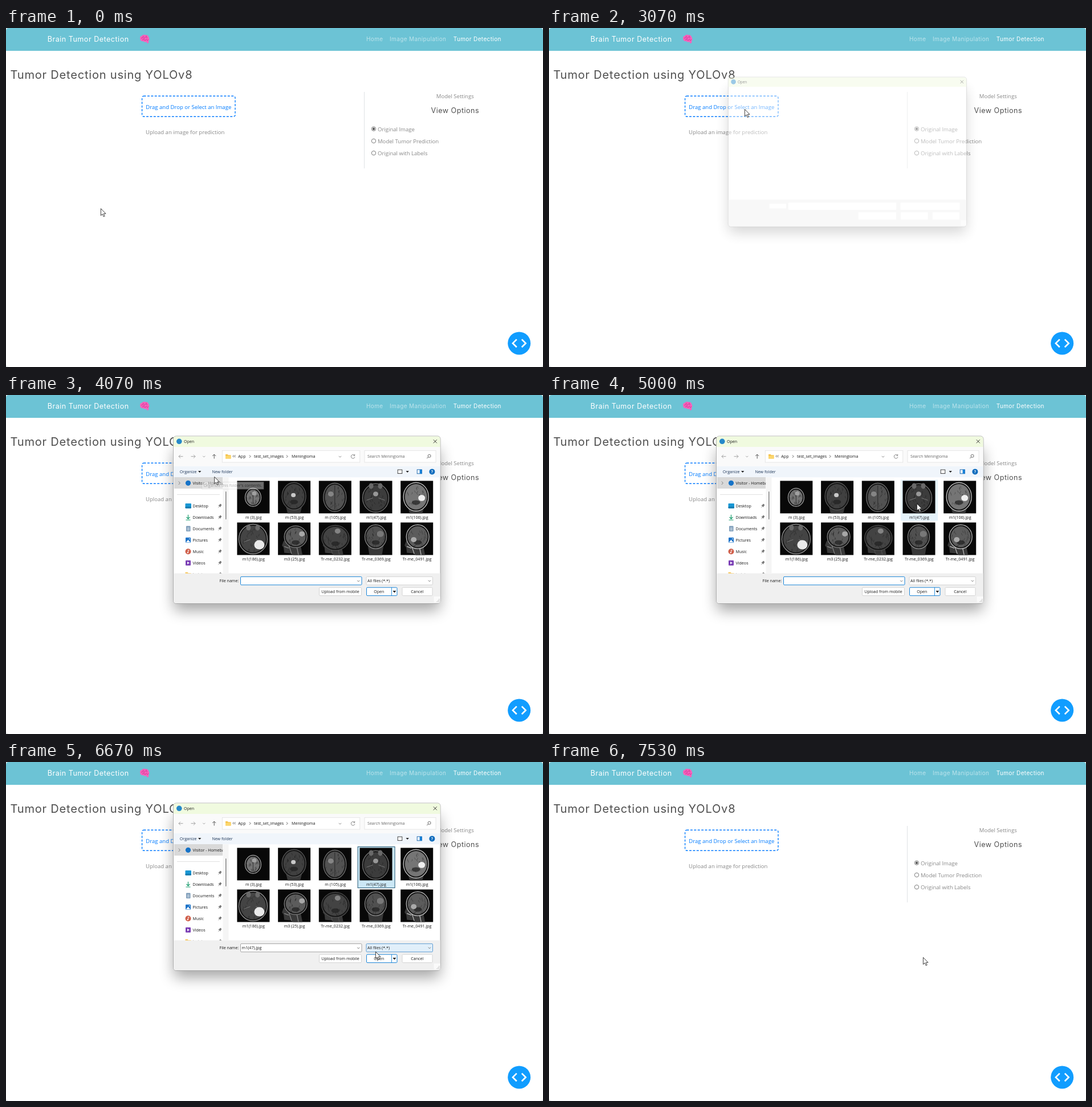
These frames come from a looping animation (942x594 px, 8 s). An HTML page:

```html
<!DOCTYPE html>
<html lang="en">
<head>
<meta charset="utf-8">
<title>Brain Tumor Detection</title>
<style>
html, body { margin: 0; width: 100%; height: 100%; overflow: hidden; background: #fff; }
svg { display: block; width: 942px; height: 594px; }
text { font-family: "Open Sans", "Noto Sans", sans-serif; white-space: pre; }
.head { font-family: Inter, "Open Sans", sans-serif; letter-spacing: .038em; }
</style>
</head>
<body>
<svg id="stage" viewBox="0 0 942 594" xmlns="http://www.w3.org/2000/svg"></svg>
<script>
const LOOP = 8000, STEP = 200 / 3;
const BLUE = '#007bff', ACCENT = '#0078d4', GREY = '#888', INK = '#1b1b1b', NAVY = '#1d3557';

const rect = (x, y, w, h, fill, extra = '') =>
  `<rect x="${x}" y="${y}" width="${w}" height="${h}" fill="${fill}" ${extra}/>`;
const oval = (x, y, rx, ry, fill, extra = '') =>
  `<ellipse cx="${x}" cy="${y}" rx="${rx}" ry="${ry}" fill="${fill}" ${extra}/>`;
const line = (d, color, w = 1, extra = '') =>
  `<path d="${d}" fill="none" stroke="${color}" stroke-width="${w}" ${extra}/>`;
const shape = (d, fill) => `<path d="${d}" fill="${fill}"/>`;
const text = (x, y, s, size, fill, extra = '') =>
  `<text x="${x}" y="${y}" font-size="${size}" fill="${fill}" ${extra}>${s}</text>`;
const label = (x, y, s, fill = INK, extra = '') => text(x, y, s, 7.1, fill, extra);
const body = (x, y, s, fill = GREY, extra = '') => text(x, y, s, 9.55, fill, extra);
const head = (x, y, s, size, fill, extra = '') => text(x, y, s, size, fill, `class="head" ${extra}`);
const group = (id, inner, extra = '') => `<g id="${id}" ${extra}>${inner}</g>`;
const MID = 'text-anchor="middle"';

function page() {
  const radio = (y, name, on) =>
    oval(645, y, 3.7, 3.7, '#fff', 'stroke="#6f6f6f" stroke-width=".9"') +
    (on ? oval(645, y, 2.2, 2.2, '#5a5a5a') : '') + body(652, y + 4, name);
  const brain =
    shape('M235.2 18.5C234.4 15 237 13.6 238.6 13.4 240.5 11.4 244 11.5 245.3 12.4 248 12 250 14 250.2 16 252 18 251.6 21.5 250 22.6L250.4 25.8 247.8 27.2 246.4 24.2C243.6 25.4 242 24 241 23.2 237.6 23.6 235 21.6 235.2 18.5Z', '#f763bd') +
    line('M237 18.5q2 -3 4 -1t4 -2M239.5 14.5q2 1 3 0M246 13.5q-1 3 2 4M239 21q2 -2 4 0t4 -2M247 22q2 0 2.5 -2', '#c92f8c', .9);
  return rect(0, 0, 942, 594, '#e4e7e8') + rect(0, 0, 942, 594, '#fff', 'rx="5"') +
    shape('M0 40V5Q0 0 5 0H937Q942 0 942 5V40Z', '#6cc3d5') +
    head(72.8, 24.3, 'Brain Tumor Detection', 12.6, '#fff') + brain +
    head(632, 23.2, 'Home', 10, '#fff', 'fill-opacity=".55"') +
    head(673, 23.2, 'Image Manipulation', 10, '#fff', 'fill-opacity=".55"') +
    head(784.8, 23.2, 'Tumor Detection', 10, '#fff') +
    head(7.5, 88.5, 'Tumor Detection using YOLOv8', 20.1, '#505050') +
    rect(238.6, 119.2, 163.4, 36, 'none', `rx="3" stroke="${BLUE}" stroke-width="1.35" stroke-dasharray="3.9 2.5"`) +
    body(245.3, 142, 'Drag and Drop or Select an Image', BLUE) +
    body(245, 185.6, 'Upload an image for prediction') +
    rect(628, 112, 1, 134, '#dfe2e5') +
    body(787.8, 123.4, 'Model Settings', GREY, MID) +
    head(787.8, 149, 'View Options', 12.6, '#505050', MID) +
    radio(176.7, 'Original Image', true) +
    radio(197.9, 'Model Tumor Prediction') +
    radio(219.1, 'Original with Labels') +
    oval(900.2, 552.4, 20, 20, '#119dff') +
    line('M895.8 545.6L889 552.4 895.8 559.2M904.8 545.6L911.6 552.4 904.8 559.2', '#fff', 2.7);
}

const names = ['m (3).jpg', 'm (53).jpg', 'm (105).jpg', 'm1(47).jpg', 'm1(106).jpg',
  'm1(186).jpg', 'm3 (25).jpg', 'Tr-me_0232.jpg', 'Tr-me_0369.jpg', 'Tr-me_0491.jpg'];
// view, centre, radii, skull tone, brain tone, spot (x, y, radius), spot tone
const scans = [
  ['top', 28, 29, 14, 16, '#a5a5a5', '#757575', 30, 22, 4, '#a0a0a0'],
  ['front', 28, 27, 21, 24, '#5b5b5b', '#404040', 27, 25, 4, '#c9c9c9'],
  ['top', 28, 29, 20, 25, '#777', '#525252', 21, 23, 5, '#858585'],
  ['top', 28, 30, 23, 25, '#777', '#3c3c3c', 28, 23, 4.5, '#989898'],
  ['front', 27, 28, 22, 25, '#d5d5d5', '#757575', 37, 30, 6, '#efefef'],
  ['top', 28, 29, 25, 26, '#9a9a9a', '#444', 39, 39, 9, '#e9e9e9'],
  ['side', 31, 25, 20, 19, '#888', '#5c5c5c', 42, 20, 5, '#a8a8a8'],
  ['side', 29, 27, 24, 22, '#505050', '#434343', 33, 15, 5, '#838383'],
  ['front', 28, 25, 19, 21, '#8d8d8d', '#505050', 36, 20, 6, '#787878'],
  ['side', 30, 25, 20, 21, '#c2c2c2', '#5c5c5c', 23, 30, 5, '#aaa'],
];
const tileX = i => 402 + 71.7 * (i % 5), tileY = i => i < 5 ? 148.5 : 221.5;

function scan([view, cx, cy, rx, ry, skull, brain, sx, sy, sr, spot], seed) {
  const rnd = () => (seed = (seed * 16807 + 11) % 2147483647) / 2147483647;
  for (let k = 0; k < 4; k++) rnd();
  let out = '';
  if (view === 'front') out += shape(`M${cx - rx * .75} 38L${cx - 11} 57H${cx + 11}L${cx + rx * .75} 38Z`, '#383838');
  if (view === 'side') out += shape('M10 32L7 40 10 44 11 53 22 54 27 57H43L40 42Z', '#393939') +
    line('M11 42L19 45M18 37L24 55M33 43L36 57', skull, 1.2);
  out += oval(cx, cy, rx, ry, '#161616', `stroke="${skull}" stroke-width="1.2"`) +
    oval(cx, cy, rx - 2.6, ry - 2.6, brain);
  let folds = '';
  for (let k = 0; k < 26; k++) {
    const a = rnd() * 6.283, r = .3 + rnd() * .5;
    folds += `M${(cx + Math.cos(a) * r * rx).toFixed(1)} ${(cy + Math.sin(a) * r * ry).toFixed(1)}q${(rnd() * 4 - 2).toFixed(1)} 2 ${(rnd() * 5 - 2.5).toFixed(1)} 4`;
  }
  out += line(folds, '#000', 1, 'opacity=".28"');
  if (view === 'top' && rx > 22) out += oval(cx - 8, 9, 4, 5, '#696969') + oval(cx + 8, 9, 4, 5, '#696969') +
    line(`M${cx - 16} 34L${cx - 5} 30M${cx + 16} 34L${cx + 5} 30`, '#777', 1);
  if (view !== 'top') out += oval(cx, cy + 10, 7, 4, '#202020', 'opacity=".7"');
  else if (rx < 22) out += line(`M${cx} ${cy - ry + 4}V${cy + ry - 4}`, '#222', .8);
  return rect(0, 0, 57, 57, '#080808') +
    `<g filter="url(#haze)">${out}${oval(sx, sy, sr, sr * .9, spot)}</g>`;
}

const tile = (name, i) => {
  const x = tileX(i), y = tileY(i);
  return rect(x, y, 65, 72, 'none', `id="tile${i}"`) +
    `<g transform="translate(${x + 3.4} ${y + 1.9})">${scan(scans[i], i * 977 + 31)}</g>` +
    label(x + 32.3, y + 68.2, name, INK, MID);
};

const icons = {
  Desktop: rect(314.5, -4.2, 10.5, 8.4, '#1797d4', 'rx="1"') + rect(314.5, 1.5, 10.5, 2.7, '#1478ad', 'rx="1"'),
  Downloads: line('M319.5 -4.5V2.5M316.5 -.5L319.5 2.7 322.5 -.5M315.5 4.7H323.5', '#179b6c', 1.2),
  Documents: rect(316, -4.7, 7.5, 9.4, '#7d9cb9', 'rx="1"') + line('M317.5 -1.5H322M317.5 .5H322M317.5 2.5H322', '#fff', .7),
  Pictures: rect(315, -4.5, 9, 9, '#1b73c9', 'rx="1"') + shape('M315.5 4L319.5 -.5 323.5 4Z', '#fff') + oval(321.8, -2.2, .9, .9, '#fff'),
  Music: oval(319.5, 0, 5, 5, '#d0604c') + line('M319.6 2V-2.6L321.6 -1.8', '#fff', .9) + oval(318.7, 2, 1.2, 1, '#fff'),
  Videos: rect(315, -4.5, 9, 9, '#7b3fb5', 'rx="1"') + shape('M318 -2.2L322 0 318 2.2Z', '#fff'),
  training: shape('M314.5 -3.5H318.5L319.8 -2.2H324.5V4H314.5Z', '#f5bd41'),
};
const pin = '<g transform="translate(375 0) rotate(40)">' +
  shape('M-1.7 -3.4H1.7V-.4L2.8 1H-2.8L-1.7 -.4Z', '#777') + line('M0 1V3.8', '#777', .7) + '</g>';

function sidebar() {
  const rows = Object.entries(icons).map(([name, icon], i) =>
    `<g transform="translate(0 ${194.3 + 20 * i})">${icon}${label(327.5, 2.5, name)}${pin}</g>`).join('');
  return `<g clip-path="url(#side)">${rect(295, 144, 85.5, 20, '#d9d9d9')}` +
    line('M302.8 151.5L305.3 154.2 302.8 157', '#666', .8) + oval(319.5, 154.3, 4.6, 4.6, '#1673c8') +
    label(327.5, 156.9, 'Visitor - Homebase') + line('M300 174.5H375', '#dadada', .8) + rows + '</g>' +
    rect(380.5, 144.3, 10, 168.2, '#f5f5f5') + rect(385, 169, 1.5, 49, '#858585', 'rx=".7"');
}

const boxes = [[411.5, 318.4, 212.5, 14.4], [632, 318.4, 116.5, 14.4], [549.5, 337.2, 74, 14.4],
  [632.5, 337.2, 53.5, 14.4], [695, 337.2, 53, 14.4]];

function dialog() {
  const shell = rect(295, 96, 465.5, 281, '#000', 'opacity=".36" filter="url(#soft)"') +
    rect(293.5, 72, 468.5, 293.5, '#fff', 'rx="5" stroke="#999" stroke-width=".8"') +
    shape('M293.9 91V77Q293.9 72.4 298.5 72.4H757Q761.6 72.4 761.6 77V91Z', '#f0fadf') +
    shape('M293.9 312.5H761.6V360.5Q761.6 365.1 757 365.1H298.5Q293.9 365.1 293.9 360.5Z', '#f0f0f0') +
    oval(303.8, 81.3, 4.8, 4.8, '#2689c9') + label(312, 84, 'Open') +
    line('M749.8 78.3L755.8 84.3M755.8 78.3L749.8 84.3', '#222', .9) +
    rect(750.5, 353, 11, 10.5, '#fafafa') +
    boxes.map(b => rect(...b, '#fff')).join('');
  const blank = rect(374.5, 320.5, 33, 9.5, '#fff');
  const frame = (i, id, stroke = '#d0d0d0') => rect(...boxes[i], '#fff', `id="${id}" rx="1.5" stroke="${stroke}" stroke-width=".9"`);
  const bar = rect(293.9, 91, 467.7, 34, '#fafafa') +
    line('M310.5 107.7H303M306 104.7L303 107.7 306 110.7M324.5 107.7H332M329 104.7L332 107.7 329 110.7', '#999', .9) +
    line('M345.3 106.8L347.3 108.8 349.3 106.8', '#888', .8) +
    line('M365.2 111.5V104M362.2 107L365.2 104 368.2 107', '#444', .9) +
    rect(379.3, 97.3, 241.5, 20.7, '#fff', 'stroke="#e0e0e0" stroke-width=".8"') +
    shape('M385 104H388.7L390 105.2H394.5V111.5H385Z', '#f5c045') + rect(385, 106.3, 9.5, 5.2, '#fbd66d', 'rx=".6"') +
    line('M399.7 105.4L398 107.3 399.7 109.2M402.5 105.4L400.8 107.3 402.5 109.2', '#333', .8) +
    label(407.3, 110.2, 'App') + label(435, 110.2, 'test_set_images') + label(501, 110.2, 'Meningioma') +
    line('M427 105.4L429 107.6 427 109.8M492 105.4L494 107.6 492 109.8', '#333', .8) +
    line('M583.8 107L586 109.1 588.2 107', '#777', .8) +
    line('M611.3 105.8A3.3 3.3 0 1 0 611.9 108.5M611.7 103.8V106.2H609.3', '#666', .8) +
    rect(629, 97.3, 125, 20.7, '#fff', 'stroke="#e0e0e0" stroke-width=".8"') +
    label(634, 110.2, 'Search Meningioma', '#666') +
    oval(742.6, 106.8, 2.5, 2.5, 'none', 'stroke="#444" stroke-width=".8"') + line('M740.8 108.6L738.3 111.1', '#444', .9);
  const tools = rect(293.9, 125, 467.7, 19.3, '#f0f5fb') +
    rect(300, 126.5, 47, 16, 'none', 'id="organize"') +
    label(304.8, 136.9, 'Organize', NAVY) + shape('M337 133H342.4L339.7 136Z', '#222') +
    label(361.4, 136.9, 'New folder', NAVY) +
    rect(687.2, 131, 7.6, 6.6, '#fff', 'stroke="#333" stroke-width=".9"') + shape('M701.5 133H706.9L704.2 136Z', '#222') +
    rect(721.2, 130.8, 8.2, 7, '#fff', 'stroke="#0f5ea8" stroke-width=".9"') + rect(725.6, 130.8, 3.8, 7, '#1681d8') +
    oval(747.4, 134.4, 5, 5, '#0f6cbd') + text(747.4, 137, '?', 7, '#fff', `font-weight="700" ${MID}`);
  const footer = label(374.5, 328, 'File name:') + frame(0, 'field', ACCENT) +
    label(413.6, 328.3, 'm1(47).jpg', INK, 'id="chosen"') + rect(413.2, 321, .8, 10, '#000', 'id="caret"') +
    frame(1, 'types') + label(634, 328.2, 'All files (*.*)') +
    line('M616.2 324.9L618.3 327 620.4 324.9M740.8 324.7L742.9 326.8 745 324.7', '#555', .8) +
    frame(2, 'mobile') + label(586.5, 346.9, 'Upload from mobile', INK, MID) +
    frame(3, 'open', ACCENT) + label(654.3, 346.9, 'Open', INK, MID) +
    line('M676.5 337.2V351.6', ACCENT, .8) + shape('M678.6 343H684.2L681.4 346.4Z', '#000') +
    frame(4, 'cancel') + label(721.3, 346.9, 'Cancel', INK, MID) +
    line('M755.5 362H760.5M757.5 360H760.5M759.2 358H760.5', '#aaa', 1, 'stroke-dasharray="1.2 .8"');
  const hint = rect(343.5, 152.4, 108.5, 12.6, '#f7f7f7', 'stroke="#bbb" stroke-width=".7"') +
    label(346.5, 161.3, 'Organize this folder\'s contents.', '#555');
  return shell + group('blank', blank) +
    group('content', bar + tools + sidebar() + group('files', names.map(tile).join('')) + footer + group('hint', hint));
}

const cursor = '<path d="M.4 .4V12.6L3.2 10 5.2 14.6 7.2 13.7 5.2 9.3H9Z" fill="#fff" stroke="#111" stroke-width=".8"/>' +
  group('busy', oval(13.5, .2, 3.8, 3.8, 'none', 'stroke="#2a86d1" stroke-width="1.6"'));

document.getElementById('stage').innerHTML =
  '<defs><filter id="soft" x="-12%" y="-20%" width="124%" height="140%"><feGaussianBlur stdDeviation="13"/></filter>' +
  '<filter id="haze"><feGaussianBlur stdDeviation=".5"/></filter>' +
  '<clipPath id="side"><rect x="294" y="144" width="86.5" height="168.5"/></clipPath></defs>' +
  page() + group('dialog', dialog()) + group('cursor', cursor);

const $ = id => document.getElementById(id);
const show = (id, on) => $(id).setAttribute('visibility', on ? 'inherit' : 'hidden');
const paint = (id, fill, stroke) => {
  $(id).setAttribute('fill', fill);
  if (stroke) $(id).setAttribute('stroke', stroke);
};

// Interpolates rows of [time, ...values]
function at(rows, t) {
  const i = rows.findIndex(r => r[0] > t);
  if (i < 0) return rows[rows.length - 1].slice(1);
  if (!i) return rows[0].slice(1);
  const a = rows[i - 1], b = rows[i], k = (t - a[0]) / (b[0] - a[0]);
  return a.slice(1).map((v, j) => v + (b[j + 1] - v) * k);
}

const path = [[933, 166, 316], [1133, 182, 323], [1333, 236, 307], [1533, 293.5, 270], [1667, 322, 216],
  [1800, 337, 172], [1933, 340, 151], [2133, 342, 137], [2333, 342, 137], [2400, 343, 142],
  [3867, 343, 142], [4067, 365, 143], [4267, 445, 154], [4467, 556, 176], [4600, 616, 190],
  [4733, 640, 193], [4867, 644, 188], [5000, 645, 190], [6000, 645, 190], [6267, 645, 218],
  [6467, 646, 274], [6667, 648, 332], [6867, 654, 340], [7067, 656, 342]];
// time, scale, opacity
const panel = [[3067, .892, .45], [3133, .95, .75], [3200, .98, .93], [3267, 1, 1],
  [7267, 1, 1], [7333, .98, .8], [7400, .95, .5], [7467, .91, .2], [7533, .89, 0]];
const fade = [[3867, 0], [3933, .9], [4067, .42], [4200, 0]];

function draw(ms) {
  const t = Math.floor((ms + 4) / STEP) * STEP + 1;
  const [x, y] = at(path, t);
  $('cursor').setAttribute('transform', `translate(${x.toFixed(1)} ${y.toFixed(1)})`);
  show('busy', t > 2660 && t < 2795);

  const shown = t > 3060 && t < 7530;
  show('dialog', shown);
  if (!shown) return;
  const [scale, alpha] = at(panel, t);
  const shift = (1 - scale) * -40;
  $('dialog').setAttribute('transform',
    `translate(${527.75 + shift} ${218.75 + shift * .4}) scale(${scale}) translate(-527.75 -218.75)`);
  $('dialog').setAttribute('opacity', alpha);
  show('blank', t < 3195);
  show('content', t > 3195);
  show('files', t > 3330);
  $('hint').setAttribute('opacity', at(fade, t)[0]);

  const inside = (x0, y0, w, h) => x >= x0 && x < x0 + w && y >= y0 && y < y0 + h;
  const picked = t > 5660;
  paint('organize', t > 3330 && inside(300, 126, 47, 17) ? '#d9eaf9' : 'none');
  names.forEach((_, i) => {
    const over = t > 3930 && inside(tileX(i), tileY(i), 65, 72);
    if (picked && i === 3) paint('tile3', '#cce8f6', '#245a78');
    else paint('tile' + i, over ? '#e5f3fb' : 'none', 'none');
  });
  show('chosen', picked);
  show('caret', t > 3400 && t < 5660 && Math.floor((t - 3400) / 533.4) % 2 === 0);
  paint('field', '#fff', t < 5860 ? ACCENT : t < 5930 ? '#5f8fb8' : '#999');
  const onTypes = inside(632, 318, 117, 16), onOpen = inside(632, 336, 54, 17);
  paint('types', onTypes ? '#e1effa' : '#fff', onTypes ? '#4f94cf' : '#d0d0d0');
  paint('open', onOpen ? (t > 7060 ? '#cce4f7' : '#e1effa') : '#fff');
}

const start = performance.now();
function tick() {
  draw((performance.now() - start) % LOOP);
  requestAnimationFrame(tick);
}
tick();
</script>
</body>
</html>
```
